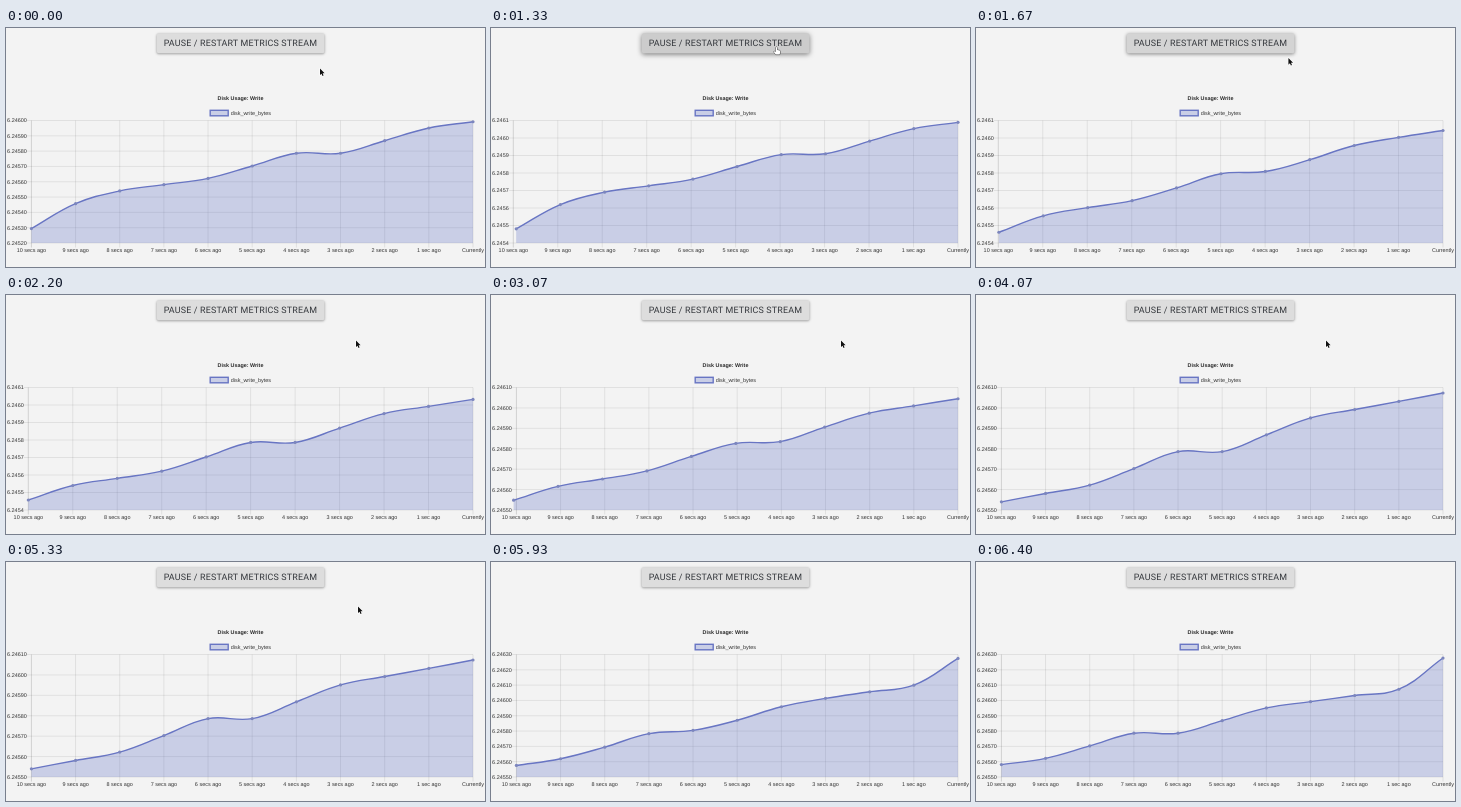
Recreate the animation shown at these times as an HTML page with a canvas. Size 479x239 px, loop 6540 ms.

```html
<!DOCTYPE html>
<html lang="en">
<head>
<meta charset="utf-8">
<title>Metrics stream</title>
<style>
html, body { margin: 0; width: 100%; height: 100%; overflow: hidden; background: #f3f3f3; }
canvas { display: block; }
</style>
</head>
<body>
<canvas id="stage" width="479" height="239"></canvas>
<script>
const ctx = document.getElementById('stage').getContext('2d');
const LOOP = 6540, FPS = 15;
const TOP = 92.5, BOTTOM = 215, RIGHT = 467, COUNT = 11;
const LINE = '#6875c3', FILL = 'rgba(92,107,192,.28)';
const SANS = '"Liberation Sans", Arial, sans-serif';

// Readings in 1e-5 above 6.245; each update slides the window by one.
const readings = [29.4, 45.7, 54, 58.1, 62.2, 70.3, 78.6, 78.6, 86.8, 95.1, 99.2, 103.2, 107.3, 127.7];
const updates = [
  { at: -2000, min: 20, max: 100, digits: 5, left: 25.4 },
  { at: 1318, min: 40, max: 110, digits: 4, left: 22.3 },
  { at: 3040, min: 50, max: 110, digits: 5, left: 25.4 },
  { at: 5600, min: 50, max: 130, digits: 5, left: 25.4 }
];
// Pointer stops: time, x, y
const pointerPath = [
  [0, 314, 40.5], [850, 314, 40.5], [1200, 285.5, 19], [1400, 285.5, 19],
  [2000, 350, 45.5], [5300, 350, 45.5], [5333, 352, 44.5], [5560, 366, 28]
];

const clamp = v => Math.max(0, Math.min(1, v));
const mix = (a, b, p) => a + (b - a) * p;
const smooth = p => p * p * (3 - 2 * p);
const easeOutQuart = p => 1 - (1 - p) ** 4;
const tickX = (u, i) => mix(u.left, RIGHT, i / (COUNT - 1));
const valueY = (u, v) => mix(BOTTOM, TOP, (v - u.min) / (u.max - u.min));

function text(str, x, y, { size = 5.45, align = 'center', weight = 400, family = SANS, color = '#333', spacing = 0 } = {}) {
  const zoom = size / 24;
  ctx.save();
  ctx.translate(x, y);
  ctx.scale(zoom, zoom);
  ctx.font = `${weight} 24px ${family}`;
  ctx.letterSpacing = spacing * 24 + 'px';
  ctx.textRendering = 'geometricPrecision';
  ctx.textAlign = align;
  ctx.textBaseline = 'alphabetic';
  ctx.fillStyle = color;
  ctx.fillText(str, 0, 24 * .36);
  ctx.restore();
}

function segment(x1, y1, x2, y2, alpha = .08) {
  ctx.strokeStyle = `rgba(0,0,0,${alpha})`;
  ctx.lineWidth = 1;
  ctx.beginPath();
  ctx.moveTo(x1, y1);
  ctx.lineTo(x2, y2);
  ctx.stroke();
}

function drawAxes(u) {
  for (let v = u.min; v <= u.max; v += 10) {
    const y = valueY(u, v);
    segment(u.left - 4.5, y, RIGHT, y);
    text((6.245 + v / 1e5).toFixed(u.digits), u.left - 4.6, y, { align: 'right' });
  }
  for (let i = 0; i < COUNT; i++) {
    const x = tickX(u, i), ago = COUNT - 1 - i;
    segment(x, TOP, x, BOTTOM + 4.5, i ? .08 : .14);
    text(ago ? `${ago} sec${ago > 1 ? 's' : ''} ago` : 'Currently', x, 222.5);
  }
}

const pointsOf = k => readings.slice(k, k + COUNT).map((v, i) => [tickX(updates[k], i), valueY(updates[k], v)]);

// Spline handles before and after point i
function handles(pts, i) {
  const p = pts[i], a = pts[i - 1] || p, b = pts[i + 1] || p;
  const da = Math.hypot(p[0] - a[0], p[1] - a[1]), db = Math.hypot(b[0] - p[0], b[1] - p[1]);
  const move = f => [p[0] + f * (b[0] - a[0]), p[1] + f * (b[1] - a[1])];
  return [move(-.4 * da / (da + db)), move(.4 * db / (da + db))];
}

function drawSeries(pts) {
  const curve = new Path2D();
  curve.moveTo(...pts[0]);
  for (let i = 1; i < COUNT; i++)
    curve.bezierCurveTo(...handles(pts, i - 1)[1], ...handles(pts, i)[0], ...pts[i]);
  const area = new Path2D(curve);
  area.lineTo(pts[COUNT - 1][0], BOTTOM);
  area.lineTo(pts[0][0], BOTTOM);
  area.closePath();
  ctx.fillStyle = FILL;
  ctx.fill(area);
  ctx.strokeStyle = LINE;
  ctx.lineWidth = 1.4;
  ctx.stroke(curve);
  ctx.fillStyle = '#7c86bd';
  for (const [x, y] of pts) {
    ctx.beginPath();
    ctx.arc(x, y, 1.6, 0, 7);
    ctx.fill();
  }
}

function drawChart(t) {
  const k = updates.findLastIndex(u => t >= u.at), u = updates[k];
  const p = easeOutQuart(clamp((t - u.at) / 1000));
  const from = pointsOf(Math.max(0, k - 1));
  text('Disk Usage: Write', 234.5, 70.5, { weight: 700, size: 5.4, color: '#2a2a2a' });
  ctx.fillStyle = FILL;
  ctx.fillRect(204.2, 82.3, 18, 5.5);
  ctx.strokeStyle = LINE;
  ctx.lineWidth = 1.4;
  ctx.strokeRect(204.2, 82.3, 18, 5.5);
  text('disk_write_bytes', 224.7, 85, { align: 'left' });
  drawAxes(u);
  drawSeries(pointsOf(k).map(([x, y], i) => [mix(from[i][0], x, p), mix(from[i][1], y, p)]));
}

function drawButton(t) {
  const hover = clamp((t - 1100) / 200) * clamp((1800 - t) / 250);
  const shade = mix(221, 204, hover);
  ctx.save();
  ctx.shadowColor = `rgba(0,0,0,${mix(.4, .5, hover)})`;
  ctx.shadowBlur = mix(2.5, 5, hover);
  ctx.shadowOffsetY = mix(.9, 1.4, hover);
  ctx.fillStyle = `rgb(${shade},${shade},${shade})`;
  ctx.beginPath();
  ctx.roundRect(150.8, 5.2, 167.6, 20, 1.8);
  ctx.fill();
  ctx.restore();
  text('PAUSE / RESTART METRICS STREAM', 234.4, 15.2,
    { size: 8.9, family: 'Roboto, sans-serif', color: '#33363b', spacing: .02 });
}

const arrow = new Path2D('M0 0V6.6L1.5 5.2L2.5 7.5L3.6 7L2.6 4.8H4.7Z');
const hand = new Path2D('M-.8 .6Q0-.5 .7 .6V3L3 3.4Q3.9 3.6 3.8 4.6L3.2 7.6H-.7L-2.7 4.9Q-2.5 3.9-1.6 4.4L-.8 5Z');

function drawPointer(t) {
  if (t > 5580) return;
  const next = pointerPath.findIndex(s => s[0] > t);
  const b = pointerPath[next < 0 ? pointerPath.length - 1 : next];
  const a = next < 0 ? b : pointerPath[next - 1];
  const p = a === b ? 1 : smooth((t - a[0]) / (b[0] - a[0]));
  const x = mix(a[1], b[1], p), y = mix(a[2], b[2], p);
  const over = y < 25.2;
  ctx.save();
  ctx.translate(x, y);
  ctx.lineJoin = 'round';
  ctx.lineWidth = over ? .8 : 1.2;
  ctx.strokeStyle = over ? '#222' : '#fff';
  ctx.fillStyle = over ? '#fff' : '#111';
  ctx.stroke(over ? hand : arrow);
  ctx.fill(over ? hand : arrow);
  ctx.restore();
}

function render(now) {
  const t = Math.floor((now % LOOP + 4) * FPS / 1000) * 1000 / FPS;
  ctx.fillStyle = '#f3f3f3';
  ctx.fillRect(0, 0, 479, 239);
  drawButton(t);
  drawChart(t);
  drawPointer(t);
}

let start;
function tick(now) {
  start ??= now;
  render(now - start);
  requestAnimationFrame(tick);
}
requestAnimationFrame(tick);
</script>
</body>
</html>
```
